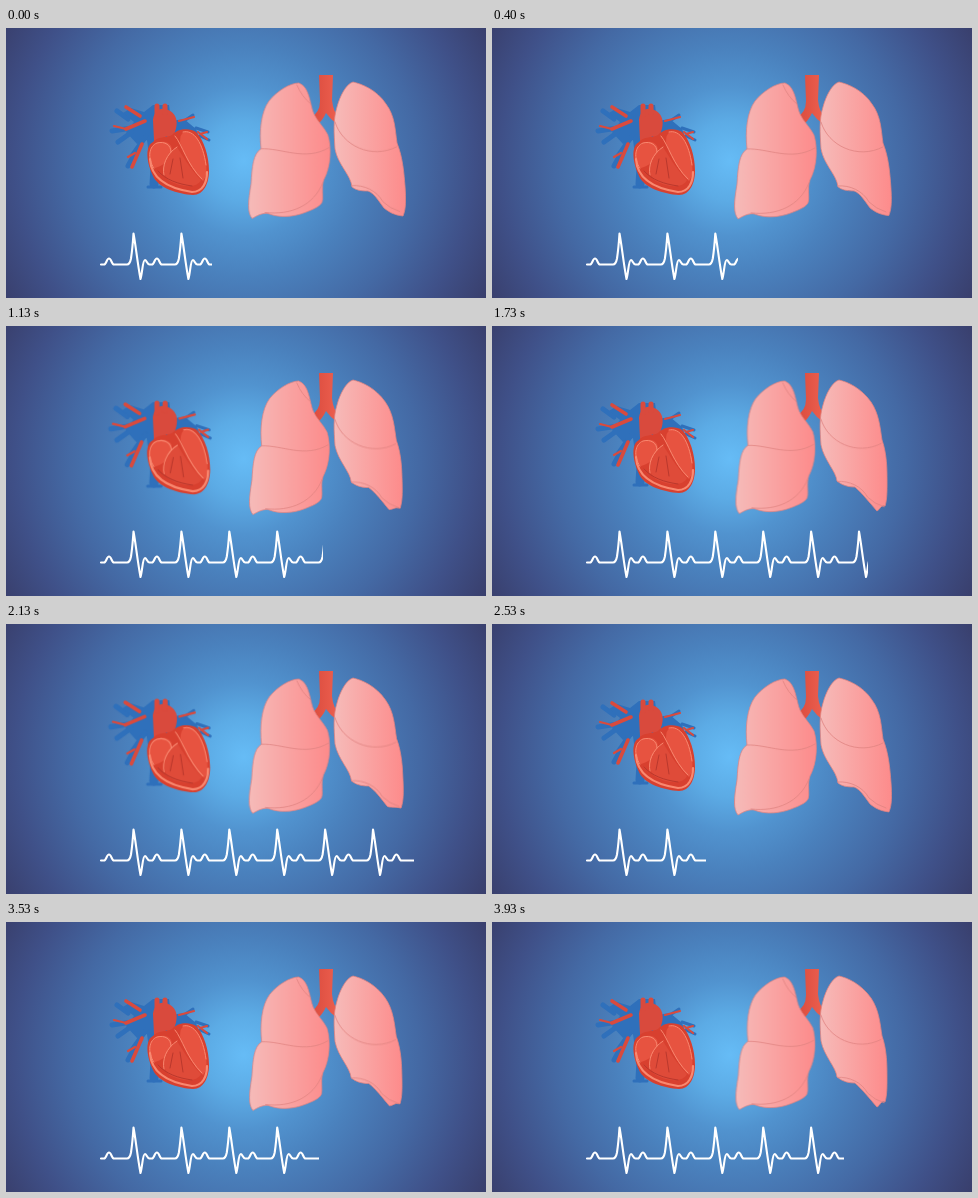
Write an HTML page that moves like this. It is 480 px wide and 270 px high and loops after 3990 ms.

```html
<!DOCTYPE html>
<html lang="en">
<head>
<meta charset="utf-8">
<title>Heart and lungs</title>
<style>
html, body { margin: 0; width: 100%; height: 100%; overflow: hidden; }
body { background: radial-gradient(circle at 238px 133px, #66bcf6 0, #5cabe5 40px, #5193cf 75px, #4a81bd 115px, #4469a4 175px, #3f5088 230px, #383c68 285px); }
svg { position: absolute; left: 0; top: 0; width: 480px; height: 270px; }

.left, .folds, .swell { animation: breathe 3990ms cubic-bezier(.37, 0, .63, 1) -4ms infinite; }
.left { --sx: .965; transform-origin: 284px 55px; }
.folds { --sx: .97; transform-origin: 328px 55px; }
.swell { animation-name: swell; }
@keyframes breathe {
  0% { transform: scale(calc(.88 + .12 * var(--sx)), .996); }
  5%, 65% { transform: none; }
  41.7%, 100% { transform: scale(var(--sx), .975); }
}
/* The lower tip swings outward as the lung fills. */
@keyframes swell {
  0%, 5%, 65% { d: path("M347 54C356 56 371 62 380 76C389 88 389 101 391 115C397 130 398 146 399 158C400 172 400 181 397 188C388 187 383 184 378 180C372 172 368 165 362 163C354 163 350 162 346 159C345 147 332 137 329 121C328 104 327 92 331 79C334 68 340 56 347 54Z"); }
  41.7%, 100% { d: path("M347 54C356 56 369 62 379 76C387 88 388 101 390 114C395 128 395 144 395 155C395 166 395 173 393 180C389 178 388 184 385 185C378 177 370 167 363 161C354 161 349 158 345 155C344 145 332 134 329 119C328 104 327 92 331 79C334 68 340 56 347 54Z"); }
}

.heart { transform-origin: 155px 110px; animation: beat 498.75ms ease-in-out infinite; }
@keyframes beat {
  0%, 8%, 45%, 100% { transform: none; }
  23% { transform: scale(1.025); }
}

/* The sweep holds at its end, then restarts part-way along. */
.trace { animation: sweep 3990ms -4ms infinite; }
@keyframes sweep {
  0% { clip-path: inset(0 274px 0 0); animation-timing-function: steps(31, end); }
  51.667% { clip-path: inset(0 72px 0 0); animation-timing-function: step-end; }
  55% { clip-path: inset(0 299px 0 0); animation-timing-function: steps(27, end); }
  100% { clip-path: inset(0 122px 0 0); }
}
.line { fill: none; stroke-linecap: round; stroke-linejoin: round; }
</style>
</head>
<body>
<svg viewBox="0 0 480 270">
  <defs>
    <linearGradient id="pink"><stop stop-color="#f6bbb9"/><stop offset="1" stop-color="#fd8b8b"/></linearGradient>
    <linearGradient id="pipe"><stop stop-color="#d94a3d"/><stop offset="1" stop-color="#ee6150"/></linearGradient>
  </defs>

  <path fill="url(#pipe)" d="M313 47H327L326 72Q327 84 334 91L331 96Q324 91 320 85Q316 94 309 98L304 90Q314 85 314 73Z"/>

  <g class="left" stroke="#e08482" stroke-width=".8" stroke-linejoin="round">
    <path fill="url(#pink)" d="M293 55C284 55 271 63 263 73C255 84 253 103 255 121C247 126 246 139 245 156C242 174 241 185 246 191C251 188 257 185 262 186C274 191 289 189 299 185C307 182 314 179 316 175C318 170 315 160 318 152C325 139 326 120 322 107C318 99 311 93 308 86C304 77 304 59 293 55Z"/>
    <path class="line" d="M255 121C276 120 299 134 323 120M259 185C285 188 308 178 317 155M291 57Q296 69 305 76"/>
  </g>

  <g stroke="#e08482" stroke-width=".8" stroke-linejoin="round">
    <path class="swell" fill="url(#pink)"/>
    <path class="line folds" d="M329 94C336 118 366 132 391 119M346 158C358 157 371 163 377 174Q384 181 394 184"/>
  </g>

  <g class="heart">
    <path fill="#2f70bb" d="M117 85L125 80L138 84L147 77H163L165 93L178 91L190 101L198 122L145 142L141 112L131 116L120 104L128 94Z"/>
    <g class="line" stroke="#2f70bb">
      <path stroke-width="9" d="M149 139L148 156"/>
      <path stroke-width="5" d="M106 103L126 100M111 83L122 91M126 128L140 108M112 114L126 104M122 138L129 125"/>
      <path stroke-width="3" d="M178 93L187 87M190 100L202 104M194 108L203 112M142 159H155"/>
    </g>
    <g class="line" stroke="#d94a3d">
      <path stroke-width="12" d="M154 112L153 92Q154 84 161 88Q167 92 163 103"/>
      <path stroke-width="5" d="M151 87V78M159 85V78"/>
      <path stroke-width="3.6" d="M120 79L134 88M120 101L139 93M136 116L126 139"/>
      <path stroke-width="2.2" d="M108 98L120 101M129 125L122 129M173 93L188 89M192 104L201 111M194 106L201 104"/>
    </g>
    <path fill="#d8402f" d="M147 114C152 108 160 110 166 107C172 100 184 100 190 104C198 112 203 128 203 143C203 155 198 167 187 167C172 166 152 160 147 148C143 140 140 128 142 121Q143 116 147 114Z"/>
    <path fill="#e75340" d="M148 117C154 112 162 113 165 118C168 126 161 137 149 140C142 132 142 122 148 117ZM178 104C188 102 196 115 199 130C202 142 200 150 197 153C188 145 179 129 174 114Q174 106 178 104Z"/>
    <path fill="#df4b39" d="M171 119C177 129 186 143 195 152C191 161 174 159 164 153C155 147 157 134 165 125Q168 121 171 119Z"/>
    <g class="line" stroke="#f98870">
      <path stroke-width="2.2" d="M144 131C145 149 160 160 186 164C197 164 201 154 201 144"/>
      <path stroke-width="1" d="M148 140C141 130 143 118 151 115C159 113 165 117 165 124M169 108C176 116 181 137 196 151M171 119C160 126 156 138 158 147M177 104C188 101 197 115 200 137"/>
    </g>
    <path class="line" stroke="#ba382d" stroke-width="1" d="M167 131L164 146M174 130L177 150M152 143C160 152 172 156 186 158"/>
  </g>
</svg>

<svg class="trace" viewBox="0 0 480 270">
  <path id="ecg" class="line" stroke="#fff" stroke-width="2.1"/>
</svg>
<script>
const START = 98, BEAT = 47.9, BASE = 236.5;
const bump = "c2.5 0 2.5 -6 5 -6s2.5 6 5 6";
const spike = "h13c2 0 3 -1 4 -6q1.5 -10 2.5 -25c2 10 4 30 7 45.5c2 -6 2 -19 4.5 -19c1.5 0 2 4.5 4.5 4.5";
let d = `M95 ${BASE}`;
for (let i = 0; i < 6; i++) d += `L${START + i * BEAT} ${BASE}${bump}${spike}`;
// Closing bump after the last spike
d += `L${START + 6 * BEAT} ${BASE}${bump}h13`;
document.getElementById("ecg").setAttribute("d", d);
</script>
</body>
</html>
```
